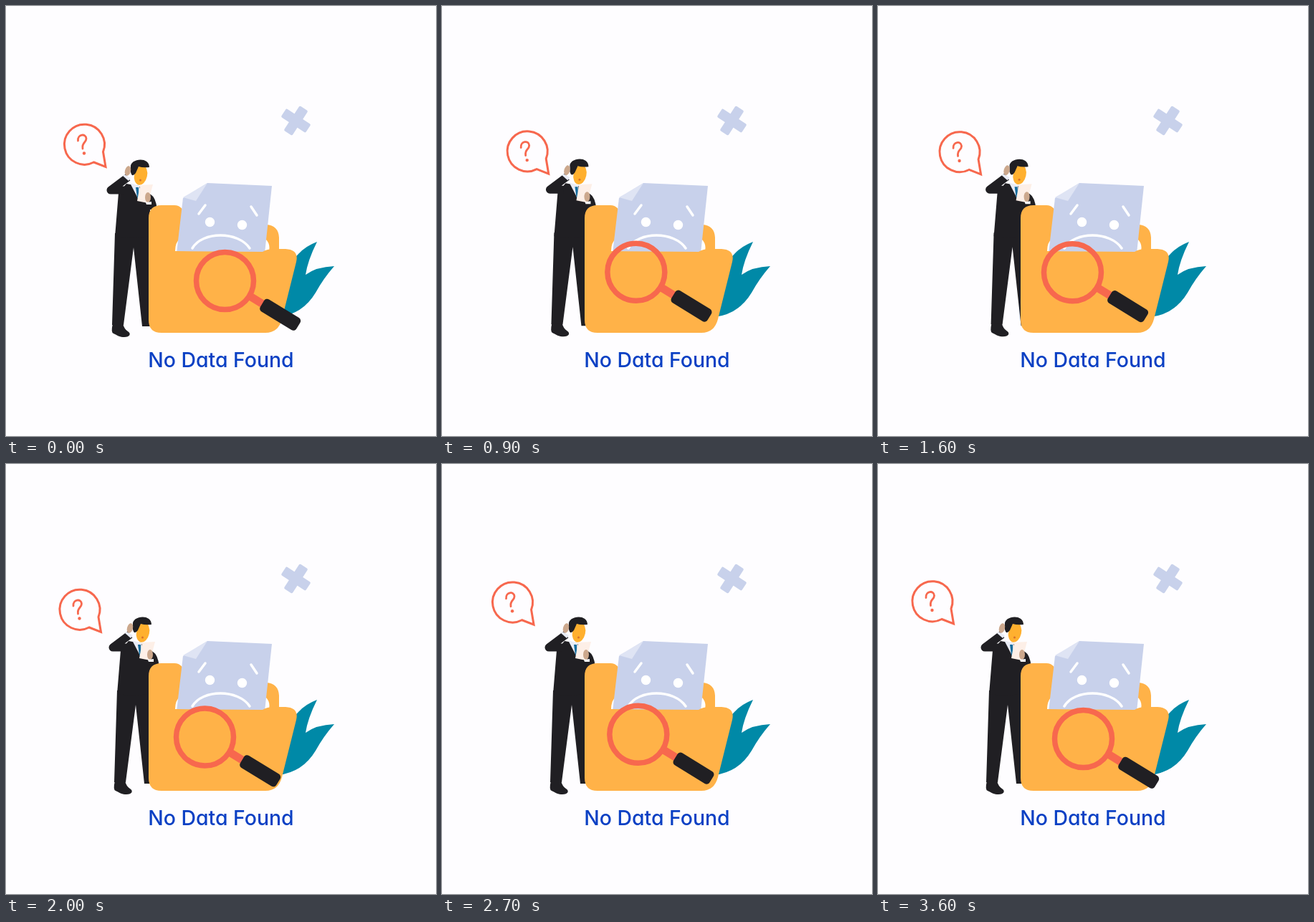
Animation of 600x600 px, one loop 3.7 s. Source, as an HTML page:

```html
<!DOCTYPE html>
<html lang="en">
<head>
<meta charset="utf-8">
<title>No Data Found</title>
<style>
  html, body { margin: 0; width: 100%; height: 100%; overflow: hidden; background: #fefdff; }
  svg { display: block; width: 100vw; height: 100vh; }
  .caption { font: 450 28.4px Inter, Lato, sans-serif; font-feature-settings: "cv11"; fill: #0b40c4; }
  .ink { fill: #201f23; }
  .skin { fill: #cca88d; }
  .shirt { fill: #e9ecf5; }
  .folder { fill: #ffb248; }
  .coral { fill: none; stroke: #f7684e; }
  .white { fill: none; stroke: #fff; stroke-linecap: round; }
</style>
</head>
<body>
<svg viewBox="0 0 600 600">
  <!-- cross -->
  <g fill="#c8d1eb" transform="translate(404.5 160) rotate(33)">
    <rect x="-20.5" y="-7" width="41" height="14" rx="2"/>
    <rect x="-7" y="-20.5" width="14" height="41" rx="2"/>
  </g>

  <!-- leaves -->
  <path fill="#0089a7" d="M380 434V380Q398 356 408 346Q418 335 434 329Q421 355 418 375Q433 364 458 363Q443 380 432 400Q414 430 380 434Z"/>

  <g id="man">
    <path class="ink" d="M155 316L151 444H167L181 336L193 446H207V312Z"/>
    <path class="ink" d="M152 442Q149 455 153 456C159 459 162 461 168 461C176 461 178 456 173 453Q168 450 166 442Z"/>
    <path class="ink" d="M171 247L160 260L155 321Q178 325 204 320V283H214Q212 266 205 262L188 250Z"/>
    <path fill="none" stroke="#201f23" stroke-width="11" stroke-linejoin="round" d="M168 256H149L173 238"/>
    <path class="shirt" d="M176 246L189 250V271Z"/>
    <path fill="#176c9c" d="M184 252H188L189 271L186 266Z"/>
    <ellipse cx="191" cy="235" rx="9" ry="14" fill="#ffb02f" transform="rotate(12 191 235)"/>
    <path class="ink" d="M177 224C175 212 203 208 203 224Q194 225 188 223L184 232Q179 239 177 231Z"/>
    <ellipse class="skin" cx="173" cy="229" rx="4" ry="7" transform="rotate(15 173 229)"/>
    <path class="shirt" d="M168 234L177 239L174 243L166 236Z"/>
    <circle cx="190.500" cy="242" r="1.500" fill="#d9712d"/>
    <path fill="#fdefe7" d="M190 249L208 248L201 274L186 271Z"/>
    <ellipse class="skin" cx="201" cy="266" rx="4" ry="7"/>
    <path fill="#fff" d="M198 273L206 272V276H199Z"/>
  </g>

  <!-- folder back -->
  <path class="folder" d="M199 345V296Q199 278 217 278H235Q247 278 251 295V305H363Q380 306 381 323V345Z"/>
  <path fill="#fff" d="M243 324Q236 330 236 342H367Q369 332 363 326Z"/>

  <!-- sad sheet -->
  <path fill="#c8d1eb" d="M281 247L371 251L361 345H238L247 268Z"/>
  <path fill="#dfe4f4" d="M281 247L265 272L247 267Z"/>
  <g fill="#fff">
    <circle cx="284.500" cy="301.500" r="6.700"/>
    <circle cx="329.500" cy="305.500" r="6.700"/>
  </g>
  <path class="white" stroke-width="3.500" d="M269 290L278 278M342 280L350 292M260 338C274 314 324 314 340 338"/>

  <!-- folder front -->
  <path class="folder" d="M199 338V342H238L358 343Q364 339 374 339H390Q409 340 405 357L385 437Q380 456 362 456H217Q199 456 199 438Z"/>

  <g id="glass">
    <circle class="coral" r="40" stroke-width="7.500"/>
    <g transform="rotate(31.500)">
      <path class="coral" stroke-width="11" d="M42 0H64"/>
      <rect class="ink" x="61" y="-10" width="59" height="20" rx="5"/>
    </g>
  </g>

  <g id="bubble" class="coral" stroke-width="3">
    <path d="M26 10.500A28 28 0 1 0 13 25L29.500 31.500Z"/>
    <path stroke-width="2.800" stroke-linecap="round" d="M-9 -5C-10 -14 2 -16 2.500 -8C2.500 -2 -4 -3 -2.500 6"/>
    <circle cx="-.5" cy="12.500" r="2.200" fill="#f7684e" stroke="none"/>
  </g>

  <text class="caption" x="300" y="503.500" text-anchor="middle">No Data Found</text>
</svg>
<script>
const LOOP = 3700, STEP = 100, HOP = 12;

// Shared key times and the few points each part drifts through
const times = [0, 500, 1200, 2000, 2400, 3000, 3600];
const glass = { x: [305.5, 282, 267, 277.5, 273, 276.5, 286.5], y: [383.5, 382, 366, 381, 385, 371, 383.5] };
const bubble = { x: [109.5, 113, 121, 103, 88, 107, 76], y: [193, 185.5, 213.5, 203, 204, 202.5, 191.5] };

const clamp01 = u => Math.min(1, Math.max(0, u));
const ease = u => u * u * (3 - 2 * u);
const mix = (a, b, u) => a + (b - a) * u;

function locate(t) {
  let i = 0;
  while (i < times.length - 2 && t >= times[i + 1]) i++;
  return { i, u: (t - times[i]) / (times[i + 1] - times[i]) };
}

function slope(values, i) {
  const a = Math.max(i - 1, 0), b = Math.min(i + 1, times.length - 1);
  return (values[b] - values[a]) / (times[b] - times[a]);
}

// Smooth curve through the key values
function drift(values, { i, u }) {
  const v = 1 - u, span = times[i + 1] - times[i];
  return mix(values[i], values[i + 1], ease(u))
    + span * u * v * (slope(values, i) * v - slope(values, i + 1) * u);
}

// The bubble hops between points, less so where it already climbs or falls
function hop(values, { i, u }) {
  const height = Math.max(0, HOP - Math.abs(values[i + 1] - values[i]) / 2);
  return height * Math.sin(Math.PI * u) ** 2;
}

// The man sways right, bobs once and comes to rest after two seconds
function sway(t) {
  const u = clamp01(t / 2000);
  return {
    x: 8.8 * Math.sin(Math.PI * u * u) ** 2 - 3 * (1 - u),
    y: (1 - u) - 4.3 * Math.sin(Math.PI * clamp01(t / 1000)) ** 2
  };
}

function place(id, x, y) {
  document.getElementById(id).setAttribute('transform', `translate(${x.toFixed(2)} ${y.toFixed(2)})`);
}

function draw(ms) {
  const t = Math.floor((ms % LOOP) / STEP) * STEP, at = locate(t), man = sway(t);
  place('man', man.x, man.y);
  place('glass', drift(glass.x, at), drift(glass.y, at));
  place('bubble', drift(bubble.x, at), drift(bubble.y, at) - hop(bubble.y, at));
}

const start = performance.now();
function tick() {
  draw(performance.now() - start);
  requestAnimationFrame(tick);
}
tick();
</script>
</body>
</html>
```
